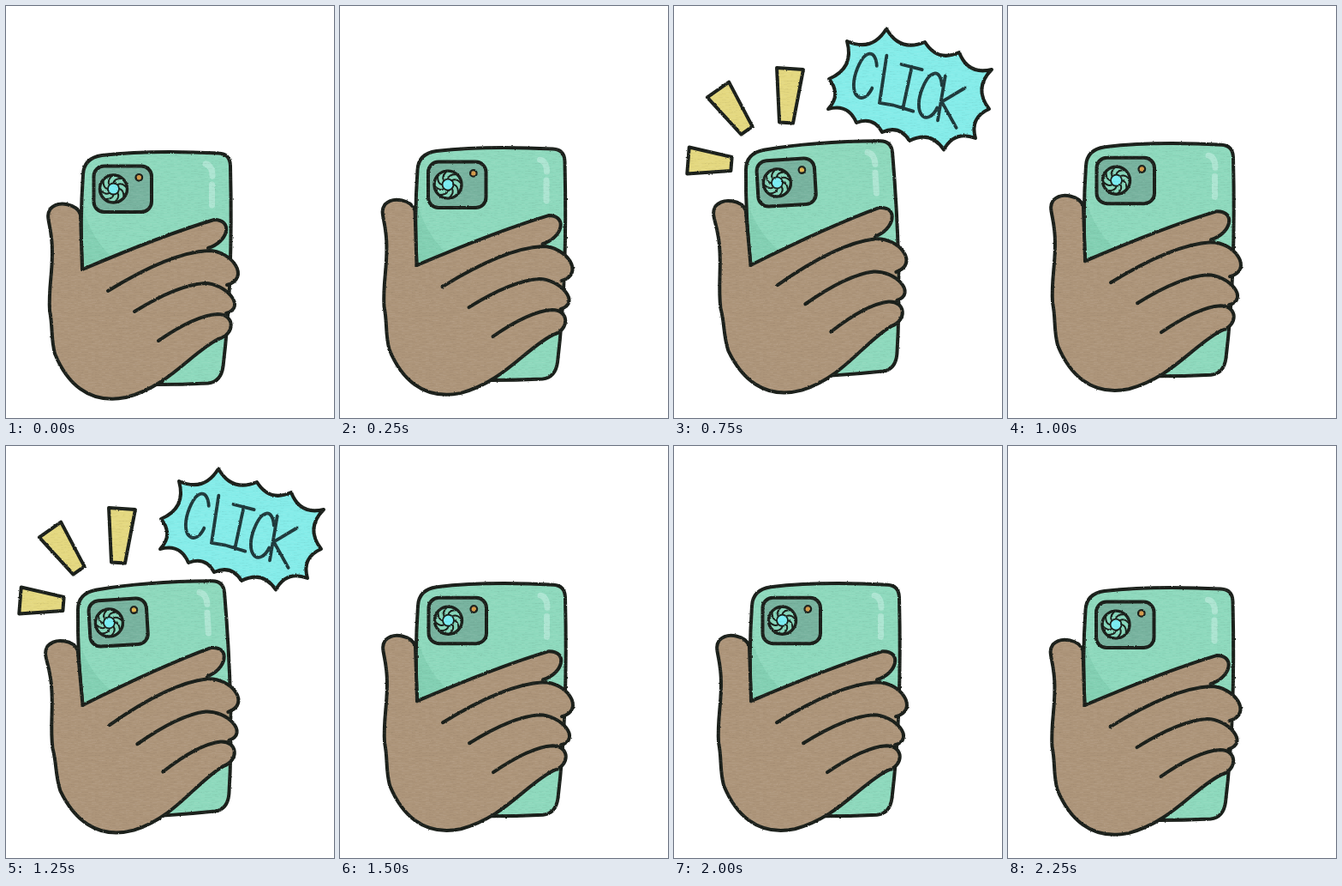
Recreate the animation shown at these times as an HTML page with a canvas. Size 383 px wide and 480 px high, loop 2500 ms.

```html
<!DOCTYPE html>
<html lang="en">
<head>
<meta charset="utf-8">
<title>Phone camera click</title>
<style>
  html, body { margin: 0; width: 100%; height: 100%; overflow: hidden; background: #fff; }
  canvas { display: block; filter: url(#rough); }
  svg { position: absolute; }
</style>
</head>
<body>
<svg width="0" height="0" aria-hidden="true">
  <filter id="rough" x="0" y="0" width="100%" height="100%" color-interpolation-filters="sRGB">
    <feTurbulence type="fractalNoise" baseFrequency="0.45" numOctaves="2" seed="4"/>
    <feDisplacementMap in="SourceGraphic" scale="2" xChannelSelector="R" yChannelSelector="G"/>
  </filter>
</svg>
<canvas id="stage" width="383" height="480"></canvas>
<script>
const canvas = document.getElementById('stage');
const ctx = canvas.getContext('2d');
const W = canvas.width, H = canvas.height;
const STEP = 250, STEPS = 10;
const INK = '#1b201b', SKIN = '#ad957a', MINT = '#8ed9bd', CYAN = '#85ece9';

function fill(path, color) {
  ctx.fillStyle = color;
  ctx.fill(path);
}
function line(path, width = 4, color = INK) {
  ctx.strokeStyle = color;
  ctx.lineWidth = width;
  ctx.stroke(path);
}
function shape(path, color, width) {
  fill(path, color);
  line(path, width);
}
function disc(x, y, r) {
  const path = new Path2D();
  path.arc(x, y, r, 0, Math.PI * 2);
  return path;
}

// Back of a finger from the palm to the knuckle k, then a round tip ending at e
function finger([ax, ay], [kx, ky], [ex, ey], bow = 0.95) {
  const path = new Path2D(), size = ey - ky, bulge = 0.7 * size;
  path.moveTo(ax, ay);
  path.quadraticCurveTo(ax + 0.62 * (kx - ax), ay + bow * (ky - ay), kx, ky);
  path.bezierCurveTo(kx + bulge, ky, ex + bulge, ey - 0.2 * size, ex, ey);
  return path;
}

// Wedge that narrows from its outer end to its inner end
function ray([x0, y0], [x1, y1]) {
  const path = new Path2D(), len = Math.hypot(x1 - x0, y1 - y0);
  const nx = (y0 - y1) / len, ny = (x1 - x0) / len;
  for (const [x, y, w] of [[x0, y0, -15.5], [x0, y0, 15.5], [x1, y1, 8], [x1, y1, -8]])
    path.lineTo(x + nx * w, y + ny * w);
  path.closePath();
  return path;
}

// Spikes joined by arcs that sag inwards in proportion to their length
function burst(tips, sag) {
  const path = new Path2D();
  path.moveTo(...tips[0]);
  tips.forEach(([x, y], i) => {
    const [nx, ny] = tips[(i + 1) % tips.length];
    path.quadraticCurveTo((x + nx) / 2 - sag * (ny - y), (y + ny) / 2 + sag * (nx - x), nx, ny);
  });
  path.closePath();
  return path;
}

const phone = new Path2D('M89 307 C87 270 88 225 90 196 Q91 177 112 174 C155 169 200 169 248 171.5 ' +
  'Q261.5 172 262 186 C264 270 262 350 253.5 420 Q251 438 236 439.5 Q205 441 175 441 Z');
const shade = new Path2D('M88 226 C93 252 104 274 124 293 L89 307 Z');
const camera = new Path2D();
camera.roundRect(102.5, 186.5, 67.5, 53.5, 12);

const palm = new Path2D('M248 388 C215 405 190 443 140 456 C95 465 70 437 57 405 C52 385 55 375 51 355 ' +
  'C49 325 57 300 53 270 C51 250 46 245 52 236 C62 226 83 231 87 243 Q88 275 89 307');
const fingers = [
  finger([89, 307], [243, 249], [236, 282], 0.7),
  finger([119, 332], [236, 285], [258, 325]),
  finger([150, 356], [232, 323], [257, 358]),
  finger([178, 390], [247, 359], [248, 388])
];
const palmArea = new Path2D(palm);
for (const [x, y] of [[236, 282], [258, 325], [257, 358]]) palmArea.lineTo(x, y);

const rays = [
  ray([135.5, 73], [131, 136]),
  ray([51.5, 97.5], [85, 145]),
  ray([16.5, 180], [67, 184])
];
const bubble = burst([
  [202, 41], [248, 26.5], [293, 42], [333, 54], [371, 74], [368, 120],
  [352, 154], [315, 167.5], [275, 157], [243, 147], [213, 136], [180, 120], [181, 85]
], 0.44);

// Hand-lettered strokes, each in a box about 24 wide and 54 high
const GLYPHS = {
  C: 'M23 13 C19 -5 6 -3 1 27 C-3 58 16 62 22 39',
  L: 'M0 -2 L1 53 L17 51',
  I: 'M0 3 L24 2 M12 2 L10 52 M1 51 L22 51',
  K: 'M0 1 L0 53 M24 8 L1 31 L22 55'
};
const lettering = new Path2D();
let pen = 0;
for (const [letter, advance] of [['C', 32], ['L', 18], ['I', 26], ['C', 25], ['K', 0]]) {
  lettering.addPath(new Path2D(GLYPHS[letter]), new DOMMatrix([1, 0.3, -0.17, 1, 216 + pen, 50 + 0.3 * pen]));
  pen += advance;
}

// Faint woven paper grain
function grain() {
  const tile = document.createElement('canvas');
  tile.width = tile.height = 96;
  const g = tile.getContext('2d');
  let seed = 7;
  const rnd = () => (seed = seed * 16807 % 2147483647) / 2147483647;
  for (let y = 0; y < 96; y += 3) {
    for (let x = 0; x < 96; x += 4) {
      g.fillStyle = rnd() < 0.5 ? 'rgba(255,255,255,.05)' : 'rgba(0,0,0,.03)';
      g.fillRect(x, y + Math.round(rnd()), 2 + rnd() * 4, 1);
    }
  }
  return ctx.createPattern(tile, 'repeat');
}
const paper = grain();

function drawLens(x, y) {
  shape(disc(x, y, 16), '#86d6bb', 3.4);
  const blades = new Path2D();
  for (let i = 0; i < 8; i++) {
    const at = (r, t) => [x + r * Math.cos(i * Math.PI / 4 + t), y + r * Math.sin(i * Math.PI / 4 + t)];
    blades.moveTo(...at(7, 0));
    blades.quadraticCurveTo(...at(12, 0.1), ...at(15, 0.65));
  }
  line(blades, 2);
  shape(disc(x, y, 6.5), '#7aecf2', 1.8);
}

function drawPhone(lit) {
  fill(phone, MINT);
  fill(shade, '#83d0b3');
  line(phone);
  line(new Path2D('M233 184 Q241 186 241 198'), 7, '#ade5d2');
  line(new Path2D('M240.5 208 V232'), 7, '#ade5d2');
  shape(camera, '#78b39f');
  drawLens(125.5, 213);
  shape(disc(155.3, 199.8, 3.8), lit ? '#e0b552' : '#d39a4c', 2.2);
}

function drawHand() {
  for (const part of [palmArea, ...fingers]) {
    fill(part, SKIN);
    line(part, 2, SKIN);
  }
  for (const part of [palm, ...fingers]) line(part);
}

function draw(step) {
  const rise = Math.min(step, STEPS - step, 2);
  const shot = rise === 2 && step % 2 === 1;
  ctx.clearRect(0, 0, W, H);
  ctx.lineCap = ctx.lineJoin = 'round';
  ctx.save();
  if (shot) {
    ctx.translate(153, 308);
    ctx.rotate(-0.059);
    ctx.translate(-153, -307);
  }
  ctx.translate(rise * 0.5, rise * -4.9);
  drawPhone(shot);
  drawHand();
  ctx.restore();
  if (shot) {
    rays.forEach(r => shape(r, '#e4d880'));
    shape(bubble, CYAN);
    line(lettering, 3.8, '#1f3a3c');
  }
  ctx.globalCompositeOperation = 'source-atop';
  fill(disc(W / 2, H / 2, H), paper);
  ctx.globalCompositeOperation = 'source-over';
}

let start = null, shown = 0;
function tick(now) {
  start ??= now;
  const step = Math.floor((now - start) / STEP) % STEPS;
  if (step !== shown) draw(shown = step);
  requestAnimationFrame(tick);
}
draw(shown);
requestAnimationFrame(tick);
</script>
</body>
</html>
```
